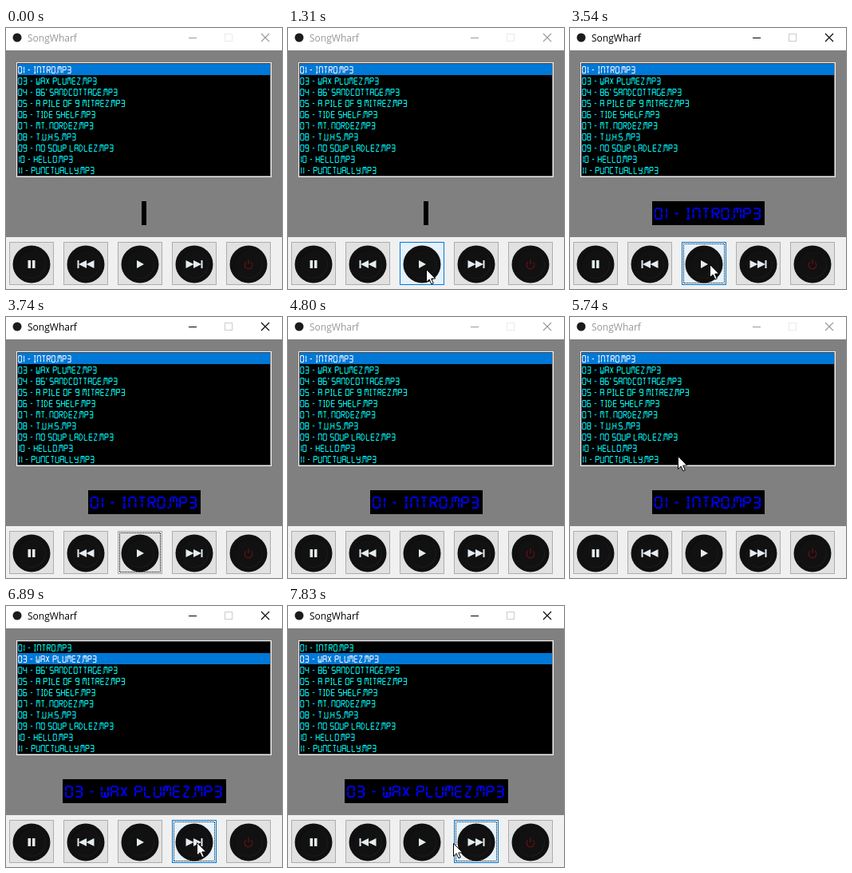
An HTML page with a canvas for the animation above (8 s loop, 346x327 px).

```html
<!DOCTYPE html>
<html lang="en">
<head>
<meta charset="utf-8">
<title>SongWharf</title>
<style>
  html, body { margin: 0; width: 100%; height: 100%; overflow: hidden; background: #808080; }
  canvas { display: block; }
</style>
</head>
<body>
<canvas id="stage" width="346" height="327" role="img" aria-label="SongWharf music player"></canvas>
<script>
const ctx = document.getElementById('stage').getContext('2d');
const LOOP = 8000;

const TRACKS = [
  '01 - INTRO', '03 - WAX PLUMEZ', "04 - 86' SANDCOTTAGE", '05 - A PILE OF 9 MITREZ',
  '06 - TIDE SHELF', '07 - MT. NORDEZ', '08 - T.U.H.S.', '09 - NO SOUP LADLEZ',
  '10 - HELLO', '11 - PUNCTUALLY'
].map(name => name + '.MP3');

// Segment font: polylines over a 3 by 3 grid of points, numbered 0 to 8 row by row.
const GLYPHS = {
  0: '0258630', 1: '258', 2: '025368', 3: '02586 35', 4: '035 258', 5: '203586',
  6: '2036853', 7: '0258', 8: '0258630 35', 9: '5302586', '-': '35',
  A: '630258 35', C: '20368', D: '0157630', E: '20368 35', F: '2036 35', G: '203685',
  H: '036 258 35', I: '02 147 68', L: '0368', M: '630258 14', N: '630258', O: '0258630',
  P: '630253', R: '630253 48', S: '203586', T: '02 147', U: '036852', W: '036852 47',
  X: '08 26', Y: '035 2586', Z: '02468'
};
const ADVANCE = { ' ': 6, '-': 9, '.': 3.5, "'": 4, 1: 6, I: 8.5 };
const advance = ch => ADVANCE[ch] || 12;
const textWidth = str => [...str].reduce((sum, ch) => sum + advance(ch), 0);
const mix = (a, b, p) => a + (b - a) * p;

function segText(str, x, y, { scale, height, weight, gap, color }) {
  ctx.strokeStyle = ctx.fillStyle = color;
  ctx.lineWidth = weight;
  ctx.beginPath();
  for (const ch of str) {
    const w = (advance(ch) - 4) * scale;
    const px = n => x + n % 3 / 2 * w;
    const py = n => y + Math.floor(n / 3) / 2 * height;
    if (ch === '.') ctx.fillRect(x, y + height - weight / 2, weight, weight);
    if (ch === "'") ctx.fillRect(x, y - weight / 2, weight, height * .3);
    for (const line of (GLYPHS[ch] || '').split(' ')) {
      for (let i = 1; i < line.length; i++) {
        const a = line[i - 1], b = line[i];
        ctx.moveTo(mix(px(a), px(b), gap), mix(py(a), py(b), gap));
        ctx.lineTo(mix(px(b), px(a), gap), mix(py(b), py(a), gap));
      }
    }
    x += advance(ch) * scale;
  }
  ctx.stroke();
}

function rect(x, y, w, h, color) {
  ctx.fillStyle = color;
  ctx.fillRect(x, y, w, h);
}

function frame(x, y, w, h, color) {
  ctx.strokeStyle = color;
  ctx.lineWidth = 1;
  ctx.strokeRect(x + .5, y + .5, w - 1, h - 1);
}

function disc(x, y, r, color) {
  ctx.fillStyle = color;
  ctx.beginPath();
  ctx.arc(x, y, r, 0, 7);
  ctx.fill();
}

function lines(color, width, ...paths) {
  ctx.strokeStyle = color;
  ctx.lineWidth = width;
  ctx.beginPath();
  for (const [x1, y1, x2, y2] of paths) {
    ctx.moveTo(x1, y1);
    ctx.lineTo(x2, y2);
  }
  ctx.stroke();
}

function titleBar(active) {
  const ink = active ? '#000' : '#999';
  rect(0, 0, 346, 28, '#fff');
  disc(14, 12, 5.5, '#1c1c1c');
  ctx.fillStyle = ink;
  ctx.font = '12px "Open Sans", "Noto Sans", sans-serif';
  ctx.fillText('SongWharf', 27, 17);
  rect(229, 12, 10, 1, ink);
  frame(274, 7, 10, 10, active ? '#ccc' : '#ebebeb');
  lines(ink, 1.1, [320, 7, 330, 17], [330, 7, 320, 17]);
}

function playlist(selected) {
  rect(13, 43, 320, 144, '#f0f0f0');
  rect(14, 44, 318, 142, '#7f7f7f');
  rect(14, 44, 317, 141, '#3f3f3f');
  rect(15, 45, 316, 140, '#000');
  const font = { scale: .5, height: 8, weight: 1, gap: .04 };
  TRACKS.forEach((name, row) => {
    const y = 48.5 + row * 14;
    if (row === selected) {
      rect(15, y - 3.5, 316, 14, '#0078d7');
      segText(name, 15.6, y, { ...font, color: '#fff' });
      return;
    }
    // Green and blue are offset sideways, as on an LCD.
    ctx.globalCompositeOperation = 'lighter';
    segText(name, 15.8, y, { ...font, color: '#0f0' });
    segText(name, 15.35, y, { ...font, color: '#00f' });
    ctx.globalCompositeOperation = 'source-over';
  });
}

function nowPlaying(track) {
  const name = TRACKS[track] || '';
  const w = 6 + Math.round(textWidth(name));
  const x = Math.round(173 - w / 2);
  rect(x, 217, w, 30, '#000');
  segText(name, x + 4, 226, { scale: 1, height: 13, weight: 2, gap: .08, color: '#00f' });
}

// Icon parts are placed relative to the button centre.
function bar(x, w) {
  ctx.fillRect(x, -5, w, 10);
}

function wedge(x, w) {
  ctx.beginPath();
  ctx.moveTo(x, -5);
  ctx.lineTo(x + w, 0);
  ctx.lineTo(x, 5);
  ctx.fill();
}

function skip() {
  wedge(-10.5, 10);
  wedge(-1, 10);
  bar(8.5, 2);
}

const ICONS = [
  () => { bar(-4.5, 3.5); bar(1, 3.5); },
  () => { ctx.scale(-1, 1); skip(); },
  () => wedge(-4, 9),
  skip,
  () => {
    ctx.strokeStyle = '#5c1015';
    ctx.lineWidth = 1.5;
    ctx.beginPath();
    ctx.arc(0, 1, 4.8, -.9, Math.PI + .9);
    ctx.moveTo(0, -6);
    ctx.lineTo(0, 0);
    ctx.stroke();
  }
];
const LOOKS = {
  plain: ['#e1e1e1', '#adadad'],
  hover: ['#e5f1fb', '#0078d7'],
  press: ['#cce4f7', '#005499']
};
const buttonX = i => 4 + i * 68;

function button(i, look, focused) {
  const x = buttonX(i);
  const [fill, edge] = LOOKS[look];
  rect(x, 268, 56, 54, fill);
  frame(x, 268, 56, 54, edge);
  if (focused) {
    ctx.setLineDash([1, 1]);
    ctx.lineDashOffset = .5;
    frame(x + 2, 270, 52, 50, '#000');
    ctx.setLineDash([]);
  }
  ctx.save();
  ctx.translate(x + 28, 296);
  const sheen = ctx.createLinearGradient(-17, -17, 17, 17);
  sheen.addColorStop(0, '#080808');
  sheen.addColorStop(1, '#202020');
  disc(0, 0, 23.5, '#101010');
  disc(0, 0, 18, sheen);
  disc(0, 0, 17, '#111');
  ctx.fillStyle = '#e4ecf0';
  ICONS[i]();
  ctx.restore();
}

const ARROW = [[0, 0], [0, 16], [3.7, 12.6], [6.4, 18.4], [8.8, 17.4], [6.2, 11.6], [11.2, 11.4]];

function pointer(x, y) {
  ctx.beginPath();
  ARROW.forEach(([dx, dy]) => ctx.lineTo(x + dx + .5, y + dy + .5));
  ctx.closePath();
  ctx.fillStyle = '#fff';
  ctx.fill();
  ctx.strokeStyle = '#000';
  ctx.lineWidth = 1;
  ctx.stroke();
}

// Pointer moves: first and last step in ms, then where it ends. It starts and rests off stage.
const TICK = 70;
const OFF_STAGE = [298, 330];
const MOVES = [
  [170, 310, 146, 295], [780, 850, 173, 305], [1310, 1450, 174, 296],
  [3540, 3540, 175, 296], [3610, 3740, 262, 330],
  [5060, 5060, 190, 302], [5130, 5130, 168, 290], [5330, 5470, 136, 179],
  [5740, 5810, 134, 168], [5880, 6030, 166, 272], [6100, 6420, 246, 309],
  [6490, 6700, 239, 296], [7420, 7830, 207, 297]
];

function pointerAt(t) {
  let [x, y] = OFF_STAGE;
  for (const [from, to, endX, endY] of MOVES) {
    if (t < from) break;
    const gaps = Math.round((to - from) / TICK);
    const done = gaps ? Math.floor((t - from) / (to - from) * gaps + 1e-6) + 1 : 1;
    const p = Math.min(1, done / (gaps + 1));
    x = mix(x, endX, p);
    y = mix(y, endY, p);
  }
  return [Math.round(x), Math.round(y)];
}

// Each click plays the next track.
const CLICKS = [{ down: 1780, target: 2 }, { down: 6690, target: 3 }];
const HOLD = 200;
const BLUR = 4800;

function draw(t) {
  const [x, y] = pointerAt(t);
  const count = CLICKS.filter(c => t >= c.down).length;
  const { down, target } = CLICKS[count - 1] || { down: -HOLD, target: -1 };
  const active = count > 0 && (t < BLUR || down > BLUR);
  const pressed = t < down + HOLD;
  const track = t < down + HOLD / 2 ? count - 2 : count - 1;

  rect(0, 28, 346, 234, '#808080');
  rect(0, 262, 346, 65, '#f0f0f0');
  titleBar(active);
  playlist(Math.max(track, 0));
  nowPlaying(track);
  for (let i = 0; i < 5; i++) {
    const left = buttonX(i) - 1;
    const over = x >= left && x < left + 57 && y >= 268 && y < 322;
    const look = !over ? 'plain' : pressed && i === target ? 'press' : 'hover';
    button(i, look, active && i === target);
  }
  pointer(x, y);
}

const start = performance.now();

function tick() {
  draw((performance.now() - start) % LOOP);
  requestAnimationFrame(tick);
}
tick();
</script>
</body>
</html>
```
